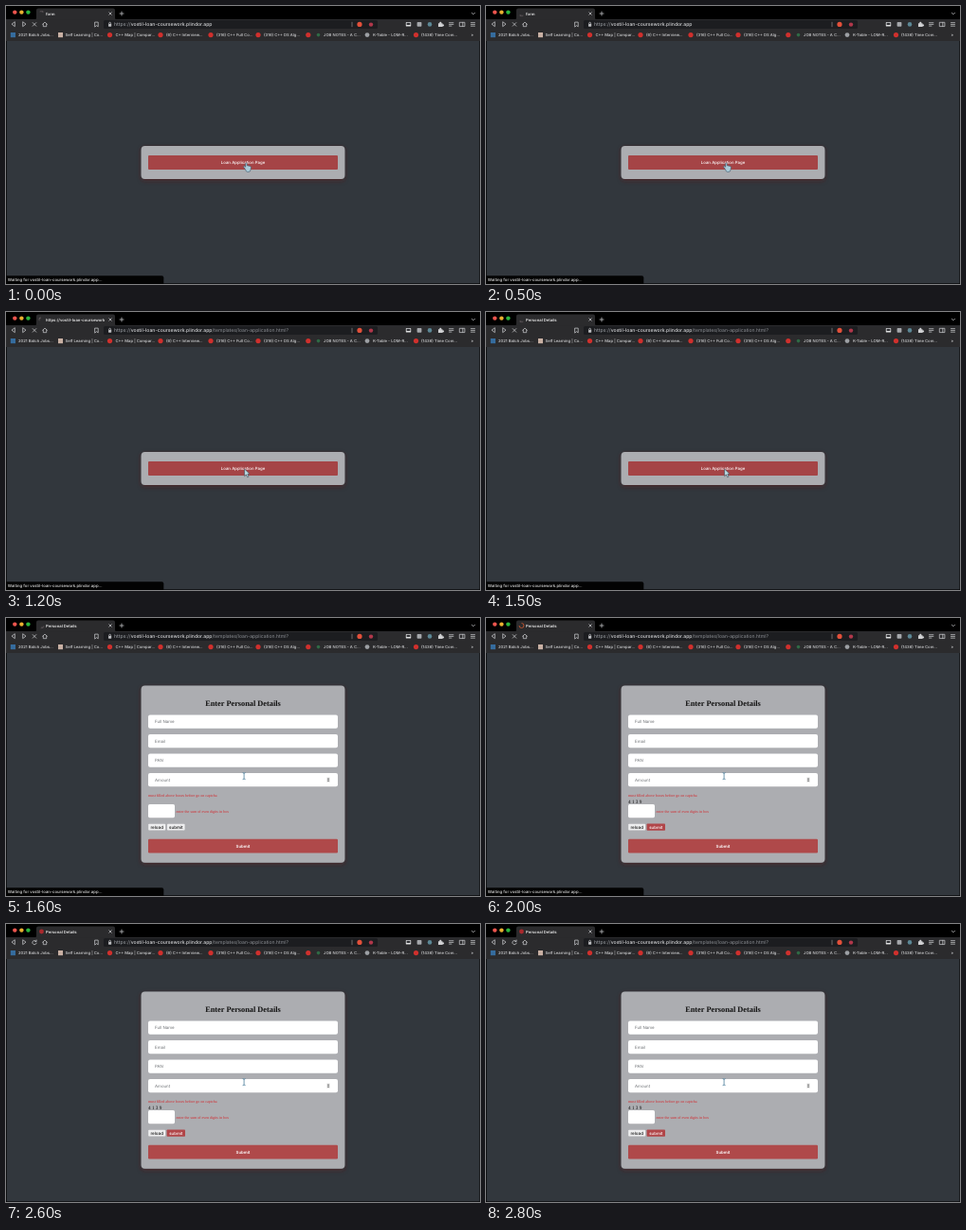
These frames come from a looping animation (500 px wide and 294 px high, 3 s). An HTML page:

```html
<!DOCTYPE html>
<html lang="en">
<head>
<meta charset="utf-8">
<title>Loan form</title>
<style>
html, body { margin: 0; width: 100%; height: 100%; overflow: hidden; background: #000; }
svg {
  display: block; width: 100vw; height: 100vh;
  font-family: Inter, "Liberation Sans", sans-serif; font-weight: 500;
  text-rendering: geometricPrecision;
}

/* .off disappears and .on appears at the chosen moment */
.off { --a: 1; --b: 0; }
.on { --a: 0; --b: 1; }
.on, .off { animation: 3s step-end infinite; }
.nav { animation-name: nav; }
.title { animation-name: title; }
.page { animation-name: page; }
.style { animation-name: style; }
.done { animation-name: done; }
@keyframes nav { 0% { opacity: var(--a); } 23.333%, 100% { opacity: var(--b); } }
@keyframes title { 0% { opacity: var(--a); } 43.333%, 100% { opacity: var(--b); } }
@keyframes page { 0% { opacity: var(--a); } 53.333%, 100% { opacity: var(--b); } }
@keyframes style { 0% { opacity: var(--a); } 63.333%, 100% { opacity: var(--b); } }
@keyframes done { 0% { opacity: var(--a); } 86.666%, 100% { opacity: var(--b); } }

.spin { fill: none; stroke-width: .9; transform-origin: 37.5px 8px; animation: spin 1s steps(10) infinite; }
.back { animation-direction: reverse; }
@keyframes spin { to { transform: rotate(360deg); } }

.line { fill: none; stroke: #c9cacc; stroke-width: .75; stroke-linecap: round; stroke-linejoin: round; }
.tab { font-size: 4.2px; font-weight: 600; fill: #e6e6e6; }
.url { font-size: 5.1px; fill: #d6d7d9; }
.dim { fill: #8d9095; }
.marks { font-size: 4.2px; fill: #d4d5d7; }
.mid { text-anchor: middle; }
.label { font-size: 4.35px; fill: #fff; }
.hint { font-size: 4.4px; font-weight: 400; fill: #6d7074; }
.serif { font-family: "Liberation Serif", "Times New Roman", serif; font-weight: 400; }
.head { font-size: 8.3px; font-weight: bold; fill: #111; }
.error { font-size: 4px; fill: #d3262b; }
.small { font-size: 4.5px; fill: #111; }
.card { fill: #acadb1; filter: url(#glow); }
</style>
</head>
<body>
<svg viewBox="0 0 500 294" preserveAspectRatio="none">
  <defs>
    <filter id="glow" x="-5%" y="-25%" width="110%" height="160%">
      <feDropShadow dx="0" dy="1.6" stdDeviation="2" flood-color="#5c1a1e" flood-opacity=".6"/>
    </filter>
    <clipPath id="tabClip"><rect x="42" y="3" width="62" height="10"/></clipPath>
  </defs>

  <rect width="500" height="294" fill="#000"/>
  <rect y="14" width="500" height="23" fill="#2b2b2d"/>
  <rect x=".7" y="37" width="498.8" height="256.4" fill="#32373d"/>

  <!-- tab strip -->
  <path d="M30 14.5q2 0 2-2V4.5q0-2 2-2h79q2 0 2 2v8q0 2 2 2z" fill="#2b2b2d"/>
  <circle cx="9.3" cy="6.6" r="2.2" fill="#ee554e"/>
  <circle cx="16.4" cy="6.6" r="2.2" fill="#e9b02f"/>
  <circle cx="23.4" cy="6.6" r="2.2" fill="#2bb53e"/>
  <path class="line" d="M108.8 6.8l2.4 2.4m0-2.4l-2.4 2.4M120 8h4M122 6v4M491.4 7.2l1.6 1.6 1.6-1.6"/>

  <text class="tab off nav" x="42" y="9.6">form</text>
  <g class="on nav"><g class="off title">
    <text class="tab" x="42" y="9.6" clip-path="url(#tabClip)">https://vostil-loan-coursework.plindor.app</text>
  </g></g>
  <text class="tab on title" x="42" y="9.6">Personal Details</text>

  <g class="off style"><path class="spin back" stroke="#71676a" d="M37.5 5.5a2.5 2.5 0 0 1 2.5 2.5"/></g>
  <g class="on style"><g class="off done">
    <path class="spin" stroke="#c5562f" d="M37.5 5.5a2.5 2.5 0 1 1-2.5 2.5"/>
  </g></g>
  <circle class="on done" cx="37.5" cy="8" r="2.4" fill="#a8292d"/>

  <!-- toolbar -->
  <path class="line" d="M9.3 17.1v4.6L6.3 19.4zM17.7 17.1v4.6l3-2.3z"/>
  <path class="line off done" d="M28.2 17.6l3.6 3.6m0-3.6l-3.6 3.6"/>
  <path class="line on done" d="M31.8 18.2a2.2 2.2 0 1 0 .4 2M32.1 17v1.6h-1.6"/>
  <path class="line" d="M38.6 19.3l2.4-2.2 2.4 2.2M39.3 19v2.7h3.4V19M94 17.1h3.2v4.8l-1.6-1.3-1.6 1.3z"/>
  <rect x="103" y="15" width="289" height="9" rx="1.5" fill="#1c1d20"/>
  <rect x="108" y="19" width="3.2" height="2.7" rx=".4" fill="#b9babd"/>
  <path class="line" d="M108.7 19v-.8a.9.9 0 0 1 1.8 0v.8"/>
  <text class="url off nav" x="114" y="21.2"><tspan class="dim">https://</tspan>vostil-loan-coursework.plindor.app</text>
  <text class="url on nav" x="114" y="21.2"><tspan class="dim">https://</tspan>vostil-loan-coursework.plindor.app<tspan class="dim" font-weight="400">/templates/loan-application.html?</tspan></text>
  <path class="line" stroke-opacity=".6" d="M365 17.2v4.6"/>
  <circle cx="373" cy="19.4" r="2.6" fill="#e2503a"/>
  <circle cx="385" cy="19.6" r="2.2" fill="#b0374a"/>
  <rect x="421.8" y="17" width="5.4" height="4.6" rx=".7" fill="#dedfe0"/>
  <rect x="422.6" y="17.7" width="3.8" height="2.3" fill="#303135"/>
  <rect x="433.6" y="17" width="4.8" height="4.8" rx=".8" fill="#a5a8ac"/>
  <circle cx="447" cy="19.4" r="2.3" fill="#5c8795"/>
  <path d="M456 18.2h1.4a1 1 0 1 1 1.8 0h1.3v1.4a1 1 0 1 1 0 1.6v.8H456z" fill="#d0d1d3"/>
  <path class="line" d="M467.5 17.7h4.4M467.5 19.4h4.4M467.5 21.1h2.4M478.7 17.3h5.2v4.3h-5.2zM481.8 17.3v4.3M490.5 17.6h4M490.5 19.4h4M490.5 21.2h4"/>

  <!-- bookmarks -->
  <rect x="4.8" y="28" width="5.2" height="5.2" fill="#356c9e"/>
  <rect x="55" y="28" width="5" height="5.2" fill="#c8b0a3"/>
  <g fill="#d0302d">
    <circle cx="109.5" cy="30.6" r="2.6"/><circle cx="163" cy="30.6" r="2.6"/>
    <circle cx="216" cy="30.6" r="2.6"/><circle cx="266" cy="30.6" r="2.6"/>
    <circle cx="318.8" cy="30.6" r="2.6"/><circle cx="432.5" cy="30.6" r="2.6"/>
  </g>
  <circle cx="329.5" cy="30.6" r="1.8" fill="#2f6a45"/>
  <circle cx="381" cy="30.6" r="2.4" fill="#9da0a4"/>
  <g class="marks">
    <text x="13" y="32.2">2021 Batch Jobs...</text>
    <text x="62.5" y="32.2">Self Learning | Co...</text>
    <text x="115.5" y="32.2">C++ Map | Compar...</text>
    <text x="169" y="32.2">(6) C++ Interview...</text>
    <text x="222" y="32.2">(316) C++ Full Co...</text>
    <text x="272" y="32.2">(316) C++ DS Alg...</text>
    <text x="335" y="32.2">JOB NOTES - A C...</text>
    <text x="387" y="32.2">K-Table - LOM-R...</text>
    <text x="438" y="32.2">(1436) Time Com...</text>
    <text x="490.5" y="32.2">»</text>
  </g>

  <!-- start page -->
  <g class="off page">
    <rect class="card" x="142.6" y="148" width="214.8" height="35" rx="4"/>
    <rect x="150" y="158" width="200" height="15" rx="1" fill="#a54446"/>
    <text class="label mid" x="250" y="167">Loan Application Page</text>
    <g class="off nav">
      <path d="M252.6 173l-2-2.9q-.2-1.2 1-.8l1.1.9v-3.8q.8-1.1 1.6 0v2.3l3.2.7q1.1.4 1 1.5l-.6 2.7q-.3 1.8-1.8 1.8h-1.7q-1.1 0-1.8-2.4z" fill="#a9cbd8" stroke="#40566a" stroke-width=".6"/>
    </g>
    <g class="on nav">
      <path d="M251.6 166v7.6l1.8-1.6 1.2 2.7 1.4-.6-1.2-2.7h2.3z" fill="#b9dce3" stroke="#3c4a58" stroke-width=".6"/>
    </g>
  </g>

  <!-- form page -->
  <g class="on page">
    <rect class="card" x="142.6" y="71.5" width="214.8" height="187.3" rx="4"/>
    <text class="serif head mid" x="250" y="93.4">Enter Personal Details</text>
    <g fill="#fff">
      <rect x="150" y="102.4" width="200" height="14.4" rx="2"/>
      <rect x="150" y="122.9" width="200" height="14.4" rx="2"/>
      <rect x="150" y="143.4" width="200" height="14.4" rx="2"/>
      <rect x="150" y="163.9" width="200" height="14.4" rx="2"/>
      <rect x="150" y="197" width="28" height="14.2" rx="1.6"/>
    </g>
    <g class="hint">
      <text x="157" y="111.2">Full Name</text>
      <text x="157" y="131.7">Email</text>
      <text x="157" y="152.2">PAN</text>
      <text x="157" y="172.7">Amount</text>
    </g>
    <rect x="338.4" y="168.6" width="3.2" height="5" fill="#dedede"/>
    <path d="M338.9 170.6l1.1-1.4 1.1 1.4zM338.9 171.7l1.1 1.4 1.1-1.4z" fill="#444"/>
    <text class="serif error" x="150" y="189.2">must filled above boxes before go on captcha</text>
    <text class="serif on style" x="150" y="195.6" font-size="5.2" fill="#111">4 1 3 9</text>
    <text class="serif error" x="179.5" y="205.6">enter the sum of even digits in box</text>

    <rect x="150.2" y="217.7" width="18" height="6.8" rx=".8" fill="#eeeeef"/>
    <text class="small mid" x="159.2" y="222.6">reload</text>
    <g class="off style">
      <rect x="170" y="217.7" width="18.6" height="6.8" rx=".8" fill="#eeeeef"/>
      <text class="small mid" x="179.3" y="222.6">submit</text>
    </g>
    <g class="on style">
      <rect x="169.6" y="217.4" width="19.4" height="7.3" rx=".8" fill="#b14649"/>
      <text class="label mid" x="179.3" y="222.6">submit</text>
    </g>
    <rect x="150" y="233.8" width="200" height="14.6" rx="1.2" fill="#af494a"/>
    <text class="label mid" x="250" y="242.7" font-weight="600">Submit</text>
    <path d="M249.6 163.6q1.5 0 1.5 1 0-1 1.5-1M251.1 164.4v5.4M249.6 170.7q1.5 0 1.5-1 0 1 1.5 1" fill="none" stroke="#4d7f9c" stroke-width=".8"/>
  </g>

  <!-- status bar -->
  <g class="off done">
    <path d="M0 285.3h164.3q2 0 2 2v6.7H0z" fill="#030303"/>
    <text x="1.8" y="291.3" font-size="4.3" fill="#e2e2e2">Waiting for vostil-loan-coursework.plindor.app...</text>
  </g>
</svg>
</body>
</html>
```
